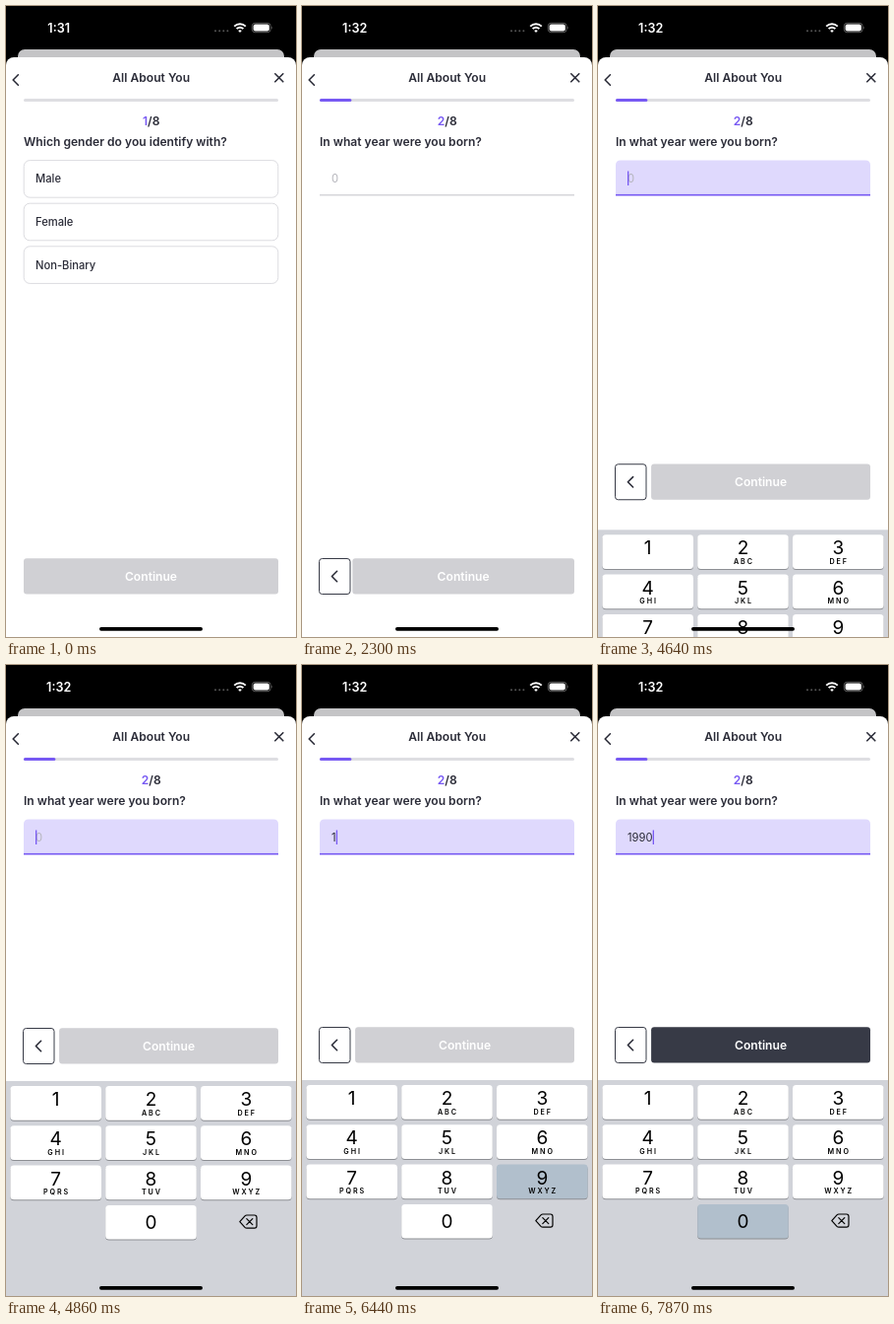
Recreate the animation shown at these times as an HTML page. Size 295x640 px, loop 8000 ms.

```html
<!DOCTYPE html>
<html lang="en">
<head>
<meta charset="utf-8">
<title>All About You</title>
<style>
  html, body { margin: 0; width: 100%; height: 100%; overflow: hidden; background: #000; }
  svg { display: block; width: 295px; height: 640px; font-family: Inter, Roboto, sans-serif; }
  text { fill: #2b2c38; }
  .bold { font-size: 12.1px; font-weight: 600; }
  .body { font-size: 11.2px; font-weight: 500; }
  .mid { text-anchor: middle; }
  .digit { font-size: 19px; fill: #000; }
  .letters { font-size: 7.2px; font-weight: 600; letter-spacing: 1.9px; fill: #000; }
  .icon { fill: none; stroke: #2b2c38; stroke-width: 1.6; stroke-linecap: round; stroke-linejoin: round; }
</style>
</head>
<body>
<svg id="stage" viewBox="0 0 295 640">
  <rect width="295" height="640"/>
  <rect x="12" y="44" width="271" height="30" rx="7" fill="#c4c4c6"/>
  <rect y="52" width="295" height="600" rx="8" fill="#fff"/>

  <text id="clock" class="mid" x="53.7" y="26.5" font-size="12.6" font-weight="600" style="fill:#fff"></text>
  <g fill="#555">
    <circle cx="213" cy="25.3" r="1"/><circle cx="217.2" cy="25.3" r="1"/>
    <circle cx="221.3" cy="25.3" r="1"/><circle cx="225.4" cy="25.3" r="1"/>
  </g>
  <g fill="none" stroke="#fff" stroke-width="1.9">
    <path d="M232.2 20.6a8.2 8.2 0 0 1 11.6 0M234.6 23.2a4.8 4.8 0 0 1 6.8 0"/>
    <path d="M236.2 25l1.8 1.9 1.8-1.9a2.6 2.6 0 0 0-3.6 0z" fill="#fff" stroke="none"/>
  </g>
  <rect x="250.3" y="17.3" width="18.8" height="9.4" rx="3" fill="none" stroke="#777" stroke-width=".8"/>
  <rect x="251.6" y="18.6" width="16.2" height="6.8" rx="1.9" fill="#fff"/>
  <path d="M270.2 20.5q1.3 1.5 0 3z" fill="#777"/>

  <path class="icon" d="M12.4 69.8L7.2 75l5.2 5.2M273.8 68.8l8 8m0-8l-8 8"/>
  <text class="bold mid" x="147.7" y="77.3">All About You</text>
  <rect x="18" y="94" width="259" height="3" rx="1.5" fill="#dedee2"/>
  <rect id="progress" x="18" y="94" height="3" rx="1.5" fill="#7759f3"/>
  <text class="bold mid" x="147.7" y="121.3"><tspan id="step" style="fill:#7759f3"></tspan>/8</text>

  <g id="genderPage">
    <text class="bold" x="18" y="141.8">Which gender do you identify with?</text>
  </g>
  <g id="yearPage">
    <text class="bold" x="18" y="141.8">In what year were you born?</text>
    <path id="field" d="M18 192v-30.5q0-5 5-5h249q5 0 5 5v30.5z" fill="#dfd9fd"/>
    <rect id="underline" x="18" y="190.9" width="259" height="1.6"/>
    <text id="year" class="body" x="30" y="179.3" style="font-weight:400"></text>
    <rect id="caret" y="167.5" width="1.3" height="14.5" fill="#7759f3"/>
  </g>

  <g id="footer">
    <g id="back">
      <rect x="17.5" y="560.5" width="31.5" height="36" rx="3" fill="#fff" stroke="#373a46"/>
      <path class="icon" d="M35.6 573.3l-5.2 5.2 5.2 5.2"/>
    </g>
    <rect id="button" y="560.2" height="36.4" rx="3"/>
    <text id="label" class="bold mid" y="582.9" style="fill:#fff">Continue</text>
  </g>

  <g id="keyboard">
    <rect width="295" height="240" fill="#d1d3d9"/>
    <path class="icon" style="stroke:#000;stroke-width:1.2"
      d="M237.8 142.6l5.2-5.8q.8-.8 2-.8h7.8q2.2 0 2.2 2.2v8.8q0 2.2-2.2 2.2h-7.8q-1.2 0-2-.8zM244.8 139.6l6 6m0-6l-6 6"/>
  </g>
  <rect x="95" y="630" width="105" height="3.7" rx="1.85"/>
</svg>
<script>
const LOOP = 8000;
const $ = id => document.getElementById(id);

function add(parent, tag, attrs, text = '') {
  const el = document.createElementNS('http://www.w3.org/2000/svg', tag);
  set(el, attrs);
  el.textContent = text;
  parent.append(el);
  return el;
}
function set(el, attrs) {
  for (const name in attrs) el.setAttribute(name, attrs[name]);
}
const move = (id, x, y) => set($(id), { transform: `translate(${x} ${y})` });
const show = (id, visible) => set($(id), { visibility: visible ? 'visible' : 'hidden' });

const options = ['Male', 'Female', 'Non-Binary'].map((name, i) => {
  const row = add($('genderPage'), 'g', { transform: `translate(18 ${156.6 + 43.6 * i})` });
  add(row, 'rect', { x: .2, width: 258.6, height: 37.6, rx: 6, fill: '#fff', stroke: '#dcdce0' });
  add(row, 'text', { class: 'body', x: 12, y: 22.8 }, name);
  return row;
});

const letters = ['', 'ABC', 'DEF', 'GHI', 'JKL', 'MNO', 'PQRS', 'TUV', 'WXYZ'];
const keys = {};
for (const digit of [1, 2, 3, 4, 5, 6, 7, 8, 9, 0]) {
  const slot = digit ? digit - 1 : 10;
  const x = 4.4 + 96.8 * (slot % 3), y = 5 + 40.3 * Math.floor(slot / 3);
  const key = add($('keyboard'), 'g', { transform: `translate(${x} ${y})` });
  add(key, 'rect', { y: 1, width: 92.6, height: 34.7, rx: 3.6, fill: '#8d8f94' });
  keys[digit] = add(key, 'rect', { width: 92.6, height: 34.7, rx: 3.6 });
  add(key, 'text', { class: 'digit mid', x: 46.3, y: digit ? 20 : 24.3 }, digit);
  if (digit) add(key, 'text', { class: 'letters mid', x: 47.2, y: 29.6 }, letters[digit - 1]);
}

// Each press: digit, key down, character appears, key up.
const presses = [
  [1, 5720, 6070, 6070],
  [9, 6440, 6570, 6800],
  [9, 7100, 7220, 7440],
  [0, 7710, 7870, LOOP]
];

// Progress from 0 to 1 in held steps, the first one taken at `start`.
function stepped(t, start, end, count, power) {
  if (t < start) return 0;
  const step = Math.min(count, 1 + Math.floor((t - start) / (end - start) * (count - 1) + 1e-6));
  return 1 - (1 - step / count) ** power;
}

function draw(t) {
  const slide = stepped(t, 1960, 2300, 4, 2);
  const rise = stepped(t, 4537, 4860, 4, 2.4);
  const focused = rise > 0;
  const settled = t >= 5720 ? 1 : 0;

  $('clock').textContent = t < 500 ? '1:31' : '1:32';
  $('step').textContent = slide ? 2 : 1;
  set($('progress'), { width: 32.4 * slide });
  set(options[1], { opacity: t >= 1170 && t < 1960 ? .22 : 1 });
  move('genderPage', -295 * slide, 0);
  move('yearPage', 295 * (1 - slide), 0);
  show('genderPage', slide < 1);

  const typed = presses.filter(p => t >= p[2]).map(p => p[0]).join('');
  $('year').textContent = typed || '0';
  $('year').style.fill = typed ? '#2b2c38' : '#b4b4ba';
  set($('caret'), { x: typed ? 30.2 + $('year').getComputedTextLength() : 30 });
  show('caret', focused);
  show('field', focused);
  set($('underline'), { fill: focused ? '#7759f3' : '#d6d6da' });

  const left = 18 + 33.3 * slide + (t >= 4430 ? 2.8 : 0);
  set($('button'), { x: left, width: 277 - left, fill: typed.length === 4 ? '#373a46' : '#d0d0d4' });
  set($('label'), { x: (left + 277) / 2 });
  set($('back'), { opacity: slide });
  move('footer', 0, -192 * rise - settled);

  move('keyboard', 0, 640 - 218 * rise - settled);
  for (const digit in keys) {
    const down = presses.some(p => p[0] == digit && t >= p[1] && t < p[3]);
    set(keys[digit], { fill: down ? '#b1bfcc' : '#fff' });
  }
}

const start = performance.now();
function tick() {
  draw((performance.now() - start) % LOOP);
  requestAnimationFrame(tick);
}
tick();
</script>
</body>
</html>
```
